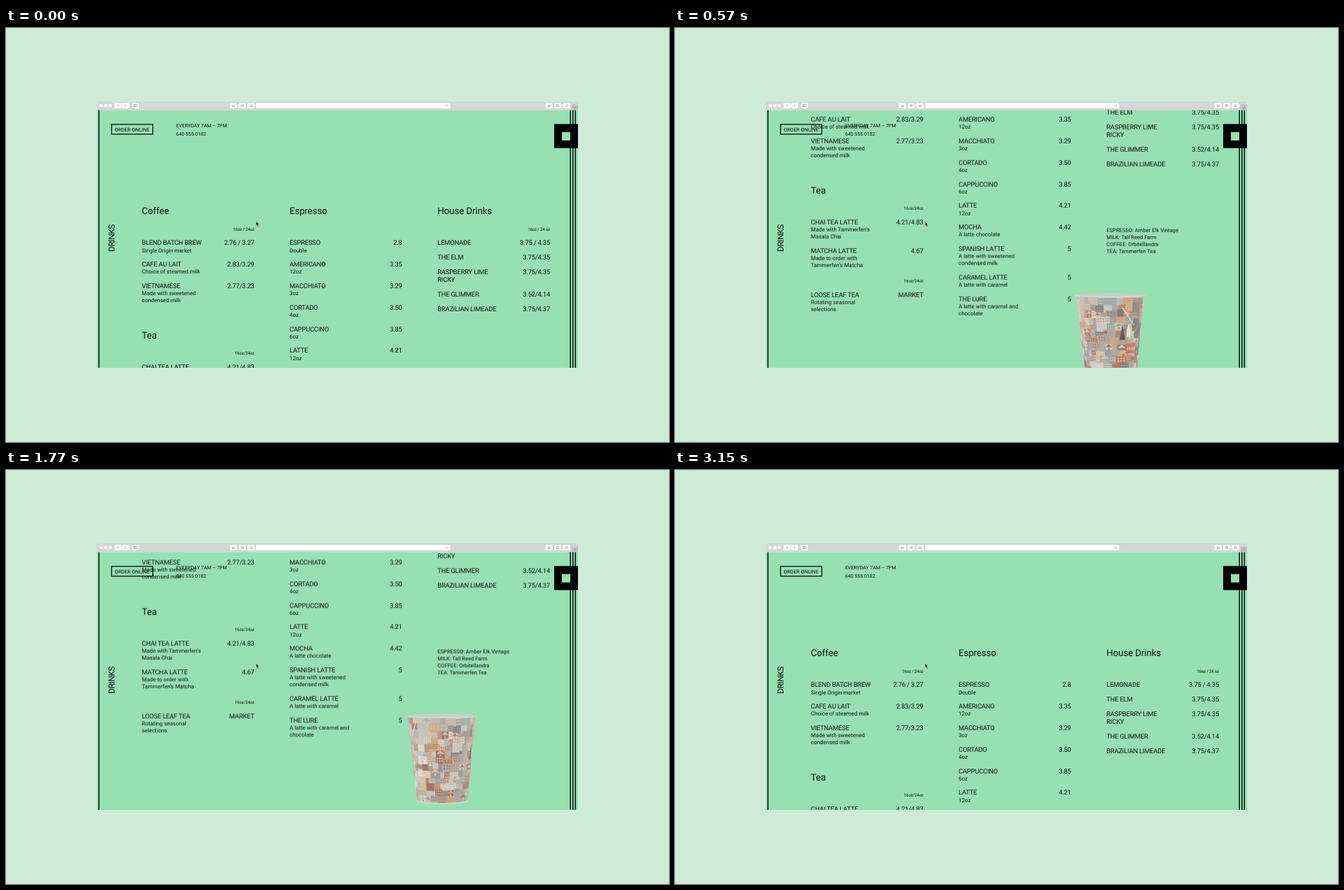
Animation of 947x592 px, one loop 3180 ms. Source, as an HTML page with a canvas:

```html
<!DOCTYPE html>
<html lang="en">
<head>
<meta charset="utf-8">
<title>Drinks menu</title>
<style>
html, body { margin: 0; width: 100%; height: 100%; overflow: hidden; background: #ceebd8; }
.stage { position: relative; width: 947px; height: 592px; overflow: hidden; }
svg, .page { position: absolute; left: 0; top: 0; }
.page { width: 947px; height: 592px; clip-path: inset(117.5px 130px 106px 130px); background: #96e0b2; }
.scroll { position: absolute; inset: 0; animation: scroll 3180ms infinite; will-change: transform; }
@keyframes scroll {
  0%, 3.05% { transform: translateY(0); animation-timing-function: cubic-bezier(.65, 0, .35, 1); }
  24.72% { transform: translateY(-236.8px); }
  77.1% { transform: translateY(-236.8px); animation-timing-function: cubic-bezier(.65, 0, .35, 1); }
  98.77%, 100% { transform: translateY(0); }
}
#cup { position: absolute; left: 566px; top: 581.8px; width: 114px; height: 136px; }
text { font-family: Roboto, "Noto Sans", sans-serif; fill: #0b1410; text-rendering: geometricPrecision; }
.head { font-size: 13.3px; letter-spacing: -.1px; }
.item { font-size: 9.4px; letter-spacing: -.2px; }
.note { font-size: 7.95px; }
.foot { font-size: 7.6px; }
.size { font-size: 6.2px; letter-spacing: -.2px; }
.info { font-size: 7px; }
.end { text-anchor: end; }
.side { font-size: 12px; letter-spacing: -.45px; }
</style>
</head>
<body>
<div class="stage">
  <div class="page">
    <div class="scroll">
      <svg id="menu" width="947" height="900"></svg>
      <canvas id="cup"></canvas>
    </div>
  </div>
  <svg width="947" height="592">
    <rect x="130" y="105" width="687" height="12.5" rx="1.5" fill="#d5d6d5"/>
    <g fill="#fff">
      <circle cx="136" cy="111" r="2.3"/><circle cx="142.5" cy="111" r="2.3"/><circle cx="149" cy="111" r="2.3"/>
      <rect x="357" y="107.2" width="277.5" height="7.6" rx="1"/>
    </g>
    <g id="buttons" fill="#fff"></g>
    <rect x="808" y="109.5" width="9" height="8" fill="#bfc1c0"/>
    <path d="M812.5 111.5v4M810.5 113.5h4" stroke="#999" stroke-width=".6"/>
    <g fill="none" stroke="#888" stroke-width=".7">
      <path d="M161 109.2l-1.6 1.8 1.6 1.8M170 109.2l1.6 1.8-1.6 1.8"/>
      <path d="M182.7 109.3h4.6v3.4h-4.6zM184.3 109.3v3.4"/>
      <path d="M323 112.3a1.8 2 0 0 1 3.6 0zM336 109.8h3v2.2h-3zM348.6 112.5v-2l1.4-1 1.4 1v2z"/>
      <path d="M774.4 110.3v2.5h2.8v-2.5M775.8 112v-2.9M786.6 109.5h2.8v2.8h-2.8z"/>
      <circle cx="800.7" cy="111" r="1.6"/><circle cx="629.3" cy="111" r="1.5" stroke="#bbb"/>
    </g>
    <path d="M132.7 117.5V486M806.2 117.5V486M809.8 117.5V486M813.3 117.5V486" stroke="#07100b" stroke-width="1.5"/>
    <rect x="783" y="137.3" width="34" height="34.4"/>
    <rect x="794" y="148.8" width="12" height="12" fill="#96e0b2"/>
    <rect x="150.8" y="137.8" width="58.8" height="14" fill="none" stroke="#07100b" stroke-width="1.3"/>
    <text class="info" x="155.2" y="147.5" style="font-size:7.25px">ORDER ONLINE</text>
    <text class="info" x="243" y="142.3">EVERYDAY 7AM – 7PM</text>
    <text class="info" x="243" y="154.2">640 555 0182</text>
    <text class="side" transform="translate(155.2 320) rotate(-90)">DRINKS</text>
    <path d="M357.2 276.6v6.6l1.5-1.3 1 2.3 1.2-.5-1-2.2h2z" fill="#111" stroke="#e8f5ec" stroke-width=".4"/>
  </svg>
</div>
<script>
const NS = 'http://www.w3.org/2000/svg';
const add = (parent, tag, attrs, content = '') => {
  const el = parent.appendChild(document.createElementNS(NS, tag));
  for (const key in attrs) el.setAttribute(key, attrs[key]);
  el.textContent = content;
};

for (const x of [155, 165.7, 179.7, 319.8, 332.3, 344.8, 770.6, 783, 795.5])
  add(document.getElementById('buttons'), 'rect', { x, y: 107.2, width: 10.2, height: 7.6, rx: 1 });

// y values are the middle of each line's capitals
const menu = document.getElementById('menu');
const drop = { head: 4.7, item: 3.4, note: 2.8, foot: 2.7, size: 2.1 };
const put = (x, y, style, content, end) =>
  add(menu, 'text', { x, y: y + drop[style], class: style + (end ? ' end' : '') }, content);

const columns = [
  { x: 194, right: 354.6,
    heads: [[261, 'Coffee'], [438.8, 'Tea']],
    sizes: [[287.5, '16oz / 24oz'], [465, '16oz/24oz'], [568.8, '16oz/24oz']],
    items: [
      [307, 'BLEND BATCH BREW', '2.76 / 3.27', 'Single Origin market'],
      [337.7, 'CAFE AU LAIT', '2.83/3.29', 'Choice of steamed milk'],
      [368.5, 'VIETNAMESE', '2.77/3.23', 'Made with sweetened', 'condensed milk'],
      [484.3, 'CHAI TEA LATTE', '4.21/4.83', 'Made with Tammerfen’s', 'Masala Chai'],
      [525.2, 'MATCHA LATTE', '4.67', 'Made to order with', 'Tammerfen’s Matcha'],
      [588.3, 'LOOSE LEAF TEA', 'MARKET', 'Rotating seasonal', 'selections']] },
  { x: 405, right: 565.7,
    heads: [[261, 'Espresso']], sizes: [],
    items: [
      [307, 'ESPRESSO', '2.8', 'Double'],
      [337.7, 'AMERICANO', '3.35', '12oz'],
      [368.5, 'MACCHIATO', '3.29', '3oz'],
      [399.3, 'CORTADO', '3.50', '4oz'],
      [430.1, 'CAPPUCCINO', '3.85', '6oz'],
      [461, 'LATTE', '4.21', '12oz'],
      [491.8, 'MOCHA', '4.42', 'A latte chocolate'],
      [522.6, 'SPANISH LATTE', '5', 'A latte with sweetened', 'condensed milk'],
      [563.4, 'CARAMEL LATTE', '5', 'A latte with caramel'],
      [594.2, 'THE LURE', '5', 'A latte with caramel and', 'chocolate']] },
  { x: 616.3, right: 777,
    heads: [[261, 'House Drinks']], sizes: [[287.5, '16oz / 24 oz']],
    items: [
      [307, 'LEMONADE', '3.75 / 4.35'],
      [327.8, 'THE ELM', '3.75/4.35'],
      [348.6, 'RASPBERRY LIME', '3.75/4.35'],
      [359.4, 'RICKY', ''],
      [380.3, 'THE GLIMMER', '3.52/4.14'],
      [401.2, 'BRAZILIAN LIMEADE', '3.75/4.37']] }
];
for (const { x, right, heads, sizes, items } of columns) {
  for (const [y, name] of heads) put(x, y, 'head', name);
  for (const [y, label] of sizes) put(right, y, 'size', label, true);
  for (const [y, name, price, ...notes] of items) {
    put(x, y, 'item', name);
    put(right, y, 'item', price, true);
    notes.forEach((note, i) => put(x, y + 10.7 + i * 10, 'note', note));
  }
}
['ESPRESSO: Amber Elk Vintage', 'MILK: Tall Reed Farm', 'COFFEE: Orbitellandra', 'TEA: Tammerfen Tea']
  .forEach((line, i) => put(616.3, 496.5 + i * 10, 'foot', line));

// Cup: patches wrapped round a turning cone, as points of (angle, height)
const canvas = document.getElementById('cup');
const ctx = canvas.getContext('2d');
const scale = 2;
canvas.width = 114 * scale;
canvas.height = 136 * scale;

let seed = 41;
const rnd = () => (seed = (seed * 16807) % 2147483647) / 2147483647;
const pick = list => list[Math.floor(rnd() * list.length)];
const warm = ['#b39a90', '#c58068', '#cda07c', '#85736e', '#a9a5a3', '#d8c8b4', '#b0705b', '#9aa6a2', '#77706f', '#d3b78e', '#c9c4be', '#8f9a99'];
const cool = ['#c3bdb8', '#a9adad', '#d6cfc4', '#cda878', '#9a8f8c', '#e0dbd2', '#c08d70', '#b4bbb8', '#d8bd98', '#99685a'];
const TAU = Math.PI * 2;

const shapes = [];
const poly = (color, ...points) => shapes.push({ color, points });
const box = (color, a, v, w, h) => poly(color, [a, v], [a + w, v], [a + w, v + h], [a, v + h]);

const rows = 13;
for (let r = 0; r < rows; r++) {
  const h = 1 / rows;
  for (let a = -Math.PI; a < Math.PI;) {
    const w = Math.min(.12 + rnd() * .28, Math.PI - a);
    const colors = Math.cos(a + w / 2) > 0 ? warm : cool;
    const v = r * h + (rnd() - .5) * .04;
    box(pick(colors), a, v, w, Math.min(h + .03, 1 - v));
    const kind = rnd(), ink = pick(colors);
    if (kind < .35) {
      for (let i = 0; i < 6; i++) box(ink, a + w * (.12 + (i % 3) * .3), v + h * (.2 + (i > 2) * .4), w * .17, h * .25);
    } else if (kind < .6) {
      poly(ink, [a, v + h * .5], [a + w / 2, v], [a + w, v + h * .5]);
      box(pick(colors), a + w * .4, v + h * .6, w * .2, h * .4);
    } else if (kind < .8) {
      for (let i = 0; i < 3; i++) box(ink, a, v + h * (.15 + i * .3), w, h * .1);
    }
    a += w;
  }
}
// larger buildings on the front face
box('#eae6dc', .22, .09, .46, .13);
for (let i = 0; i < 10; i++) box('#665d5c', .25 + (i % 5) * .085, .11 + (i > 4) * .055, .06, .04);
poly('#6f6b6c', [-.4, .32], [-.28, .24], [.02, .27], [.1, .4], [.06, .5], [-.3, .48]);
box('#a5d9b8', -.5, .4, .24, .09);
poly('#eadfce', [-.6, .38], [-.52, .32], [-.44, .38], [-.44, .47], [-.6, .47]);
poly('#544c4d', [-.86, .5], [-.76, .32], [-.64, .5]);
box('#bf6c50', -.6, .55, .5, .12);
for (let i = 0; i < 5; i++) box('#dcc0a8', -.55 + i * .09, .59, .05, .04);
box('#5b5452', .58, .86, .1, .05);
// white houses and bright wires on the back face
for (let i = 0; i < 4; i++) {
  const a = 2 + i * .26, v = .6 + (i % 2) * .12;
  poly('#ebe7df', [a, v + .05], [a + .1, v], [a + .2, v + .05], [a + .2, v + .14], [a, v + .14]);
  box('#8d8583', a + .07, v + .08, .05, .06);
}
for (let i = 0; i < 9; i++) {
  const a = i * .7 - 2.9, v = .05 + (i * .37 % 1) * .6, lean = i % 2 ? .5 : -.4;
  poly(i % 3 ? '#df8650' : '#ecdcb6', [a, v], [a + .04, v], [a + lean + .04, v + .22], [a + lean, v + .22]);
}

const mix = (a, b, k) => a + (b - a) * k;
const spinKeys = [[0, 10], [750, 6.65], [1380, 3.8], [1770, 2], [2100, 2], [2460, 0], [3180, 0]];
function spinAt(t) {
  const i = spinKeys.findIndex(key => t < key[0]);
  const [t0, a] = spinKeys[i - 1], [t1, b] = spinKeys[i];
  return mix(a, b, (t - t0) / (t1 - t0));
}

function drawCup(t) {
  const spin = spinAt(t);
  const sway = (1 - Math.cos(spin)) / 2;
  const topX = 54.5 + 2 * sway;
  const at = (a, v) => [
    mix(topX, 57, v) + mix(47.5 + 1.5 * sway, 36, v) * Math.sin(a),
    mix(9.5 - 2 * sway, 127, v) + mix(2, 5, v) * Math.cos(a)
  ];
  const trace = points => {
    ctx.beginPath();
    for (const [a, v] of points) ctx.lineTo(...at(a, v));
  };
  const edge = v => Array.from({ length: 25 }, (_, i) => [(i / 24 - .5) * Math.PI, v]);
  const body = [...edge(0), ...edge(1).reverse()];

  ctx.setTransform(scale, 0, 0, scale, 0, 0);
  ctx.clearRect(0, 0, 114, 136);
  trace(body);
  ctx.fillStyle = '#c5b5a6';
  ctx.fill();
  ctx.save();
  ctx.clip();
  for (const { color, points } of shapes) {
    const first = points[0][0];
    const start = ((first + spin + Math.PI) % TAU + TAU) % TAU - Math.PI;
    const moved = points.map(([a, v]) => [Math.max(-Math.PI / 2, Math.min(Math.PI / 2, start + a - first)), v]);
    if (moved.every(p => p[0] === moved[0][0])) continue;
    trace(moved);
    ctx.fillStyle = color;
    ctx.fill();
  }
  const shade = ctx.createLinearGradient(6, 0, 104, 0);
  shade.addColorStop(0, 'rgba(225,225,220,.4)');
  shade.addColorStop(.3, 'rgba(225,225,220,.12)');
  shade.addColorStop(.75, 'rgba(225,225,220,.1)');
  shade.addColorStop(1, 'rgba(215,215,210,.35)');
  ctx.fillStyle = shade;
  ctx.fillRect(0, 0, 114, 136);
  ctx.restore();

  trace(edge(1));
  ctx.strokeStyle = '#d9d4cb';
  ctx.lineWidth = 2;
  ctx.stroke();

  const rim = (y, rx, ry, color) => {
    ctx.beginPath();
    ctx.ellipse(topX, y - 2 * sway, rx + 1.5 * sway, ry, 0, 0, TAU);
    ctx.fillStyle = color;
    ctx.fill();
  };
  rim(8.2, 50.5, 3.2, '#d3d6d0');
  rim(7.3, 49, 1.6, '#c3cec6');
}

function tick(now) {
  drawCup(now % 3180);
  requestAnimationFrame(tick);
}
requestAnimationFrame(tick);
</script>
</body>
</html>
```
